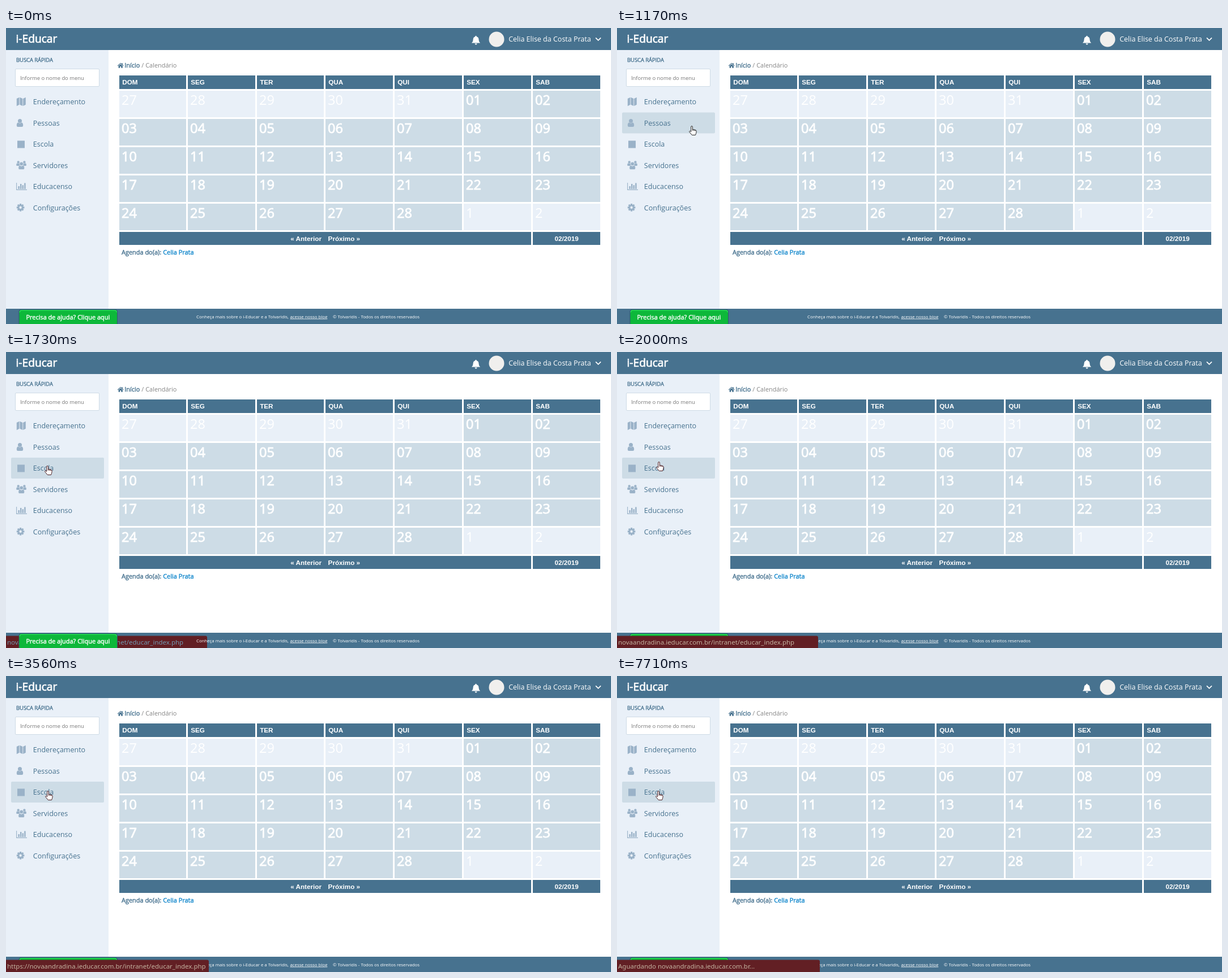
Animation of 1068x524 px, one loop 8 s. Source, as an HTML page:

```html
<!DOCTYPE html>
<html lang="pt-BR">
<head>
<meta charset="utf-8">
<title>Calendário</title>
<style>
html, body { margin: 0; width: 100%; height: 100%; overflow: hidden; background: #fff; }
svg { display: block; width: 1068px; height: 524px; }
text { font-family: "Open Sans", sans-serif; white-space: pre; }
.table { font-family: "Liberation Sans", Arial, sans-serif; font-weight: bold; }
.status { font-family: "Noto Sans", sans-serif; }
</style>
</head>
<body>
<svg id="stage" viewBox="0 0 1068 524"></svg>
<script>
const BLUE = '#47728f', PALE = '#e9f0f8', CELL = '#cddce6', ICON = '#9ab2c8';
const stage = document.getElementById('stage');

const rect = (x, y, w, h, fill, extra = '') =>
  `<rect x="${x}" y="${y}" width="${w}" height="${h}" fill="${fill}" ${extra}/>`;
const text = (x, y, size, fill, str, extra = '') =>
  `<text x="${x}" y="${y}" font-size="${size}" fill="${fill}" ${extra}>${str}</text>`;
// Emboldened regular weight: a thin outline in the text colour
const bold = (x, y, size, fill, str) =>
  text(x, y, size, fill, str, `stroke="${fill}" stroke-width="${(size * .038).toFixed(2)}"`);
const path = (d, fill, extra = '') => `<path d="${d}" fill="${fill}" ${extra}/>`;
const line = (d, color, width) =>
  path(d, 'none', `stroke="${color}" stroke-width="${width}"`);
const person = (x, y, k) =>
  `<g transform="translate(${x} ${y}) scale(${k})"><circle cx="5.5" cy="3.5" r="3.5"/>` +
  '<path d="M2.2 6.2Q5.5 9 8.8 6.2 11.2 7 11.2 11.5 11.2 14 9 14H2Q-.2 14-.2 11.5-.2 7 2.2 6.2z"/></g>';

function header() {
  return rect(0, 0, 1068, 39, BLUE) +
    bold(17.5, 26, 19.2, '#fff', 'i-Educar') +
    path('M829.5 13.8q1.2 0 1.2 1.4 3.8 1 3.8 5.4 0 4 2.6 6H822q2.6-2 2.6-6 0-4.4 3.7-5.4 0-1.4 1.2-1.4zM827.6 27.4h4q-.2 2.2-2 2.2t-2-2.2z', '#fff') +
    '<circle cx="866" cy="20" r="13.5" fill="#f0efed"/>' +
    text(887.2, 24, 12.5, '#fff', 'Celia Elise da Costa Prata') +
    line('M1041 17.3l4.5 4.5 4.5-4.5', '#fff', 1.7);
}

function sidebar() {
  const items = ['Endereçamento', 'Pessoas', 'Escola', 'Servidores', 'Educacenso', 'Configurações'];
  const teeth = [0, 45, 90, 135].map(a =>
    rect(24, 311, 3.2, 13.6, ICON, `transform="rotate(${a} 25.6 317.8)"`)).join('');
  return rect(0, 39, 181, 458, PALE) +
    rect(9, 149.5, 164, 37, CELL, 'rx="2" id="hover"') +
    bold(18, 60, 9.4, BLUE, 'BUSCA RÁPIDA') +
    rect(16.5, 72.5, 148, 31, '#fff', 'rx="1.5" stroke="#cedbe6"') +
    text(25, 91.5, 9.4, '#777', 'Informe o nome do menu') +
    items.map((s, i) => text(47.8, 135 + 37.5 * i, 12.5, BLUE, s)).join('') +
    path('M18.8 125l4.6-2.3v13l-4.6 2.5zM24.3 122.7l5 2.4v13l-5-2.4zM30.2 125.1l4.6-2.4v13l-4.6 2.4z', ICON) +
    `<g fill="${ICON}">${person(19, 161, 1)}` +
    `${person(18.3, 235.3, .62)}${person(29, 235.3, .62)}</g>` +
    rect(20, 199.5, 13, 13, ICON) +
    `<g fill="${ICON}" stroke="${PALE}" stroke-width=".7" id="front">${person(22, 237.2, .95)}</g>` +
    line('M18.6 274v12.4H37', ICON, 1.1) +
    [[21.5, 5], [25, 9], [28.6, 6.8], [32.2, 10.5]].map(([x, h]) =>
      rect(x, 285 - h, 2.4, h, ICON)).join('') +
    teeth + `<circle cx="25.6" cy="317.8" r="3.7" fill="none" stroke="${ICON}" stroke-width="3"/>` +
    `<circle cx="25.6" cy="317.8" r="2.2" fill="${PALE}"/>`;
}

function calendar() {
  const left = [200, 321, 443, 564, 686, 808, 930, 1052];
  const names = ['DOM', 'SEG', 'TER', 'QUA', 'QUI', 'SEX', 'SAB'];
  let out = path('M196.8 66.6l5.4-4.9 2.1 1.9v-1.4h1.6v2.9l1.8 1.5-.7.8-4.8-4.3-4.7 4.3zM198.6 67.2l3.6-3.2 3.7 3.2v3.6h-2.7v-2.7h-1.9v2.7h-2.7z', BLUE) +
    bold(209.3, 70, 10.95, BLUE, 'Início') +
    text(239.3, 70, 10.95, '#858585', '/ Calendário');
  names.forEach((name, c) => {
    const x = left[c], w = left[c + 1] - 3 - x;
    out += rect(x, 84, w, 24, BLUE) + text(x + 5.2, 100.2, 11.7, '#fff', name, 'class="table"');
    for (let r = 0; r < 5; r++) {
      const day = r * 7 + c - 4, y = 111 + 50 * r, inMonth = day > 0 && day < 29;
      const label = inMonth ? String(day).padStart(2, '0') : day < 1 ? day + 31 : day - 28;
      out += rect(x, y, w, 47, inMonth ? CELL : PALE) +
        (inMonth ? bold : text)(x + 4, y + 25, 23.5, '#fff', label);
    }
  });
  return out + rect(200, 361, 727, 23, BLUE) + rect(930, 361, 119, 23, BLUE) +
    [[502.2, '« Anterior'], [568.6, 'Próximo »'], [968.6, '02/2019']].map(([x, s]) =>
      text(x, 376.5, 11.7, '#fff', s, 'class="table"')).join('') +
    bold(204, 400.5, 10.95, BLUE, 'Agenda do(a):') +
    bold(277.2, 400.5, 10.95, '#1488cc', 'Celia Prata');
}

function footer() {
  return '<g id="footer">' +
    text(336, 513.7, 7.8, '#fff', 'Conheça mais sobre o i-Educar e a Tolvaridis,') +
    text(501.5, 513.7, 7.8, '#fff', 'acesse nosso blog', 'text-decoration="underline"') +
    text(577, 513.7, 7.8, '#fff', '© Tolvaridis - Todos os direitos reservados') +
    path('M22.5 524V502.5q0-4.5 4.5-4.5H192.500q4.500 0 4.500 4.500V524z', '#2f5a70') +
    path('M23.5 524V503q0-4 4-4H192q4 0 4 4V524z', '#0db83a') +
    line('M24.2 503.500q0-3.700 3.700-3.700H191.600q3.700 0 3.700 3.700', '#2be25a', 1.3) +
    bold(35.5, 516, 10.95, '#fff', 'Precisa de ajuda? Clique aqui') + '</g>';
}

stage.innerHTML = rect(0, 0, 1068, 524, '#fff') + sidebar() + header() + calendar() +
  rect(0, 497, 1068, 27, BLUE) + footer() +
  '<g id="status"><path id="bar" fill="#621f24"/>' +
  text(2, 517.6, 11.47, '#c3b29f', '', 'class="status" id="message"') + '</g>' +
  '<path id="cursor" fill="#fff" stroke-linejoin="round"/>';

const [hover, foot, status, bar, message, cursor] =
  ['hover', 'footer', 'status', 'bar', 'message', 'cursor'].map(id => document.getElementById(id));

const HAND = 'M3.700 10V1.900a1.300 1.300 0 0 1 2.600 0V6.400l4.700 1q2.400.5 2.200 2.900l-.6 3-1.100 3.200H5.300L1 11.200q-.9-1.600.4-1.900 1-.2 2.300 1.500zM6.300 6.400v2.500M8.700 7v2.200M11 7.500v2';
const ARROW = 'M.5.5V13.300l3-2.600 2 4.600 2.300-1-2-4.500H9.500z';
const HOST = 'novaandradina.ieducar.com.br', PAGE = HOST + '/intranet/educar_index.php';

// [start, text] of the status bubble
const messages = [[0, ''], [1730, PAGE], [2240, 'Aguardando soquete disponível...'],
  [2460, 'Resolvendo host...'], [3010, 'https://' + PAGE], [7480, 'Resolvendo host...'],
  [7630, `Aguardando ${HOST}...`]];
// [start, x, y, shape] of the pointer once it rests on the menu
const rests = [[1600, 68, 201, HAND], [1910, 68, 198, HAND], [1990, 69, 194, HAND],
  [2080, 69, 197, HAND], [2160, 69, 201, HAND], [2240, 72, 204, ARROW], [3090, 69, 203, HAND],
  [3410, 72, 204, ARROW], [3560, 69, 203, HAND], [7630, 72, 204, ARROW], [7710, 68, 203, HAND]];
const at = (list, t) => list.filter(k => k[0] <= t).pop();
const mix = (a, b, k) => a + (b - a) * k;

function pointer(t) {
  if (t >= 1600) return at(rests, t).slice(1);
  const i = Math.floor((t - 860) / 61.6);
  const [x, y] = i < 5
    ? [mix(212, 127, i / 5), mix(166, 173, i / 5)]
    : [mix(127, 68, (i - 5) / 7), mix(173, 201, (i - 5) / 7)];
  return [Math.round(x), Math.round(y), x < 169 ? HAND : ARROW];
}

function draw() {
  const t = performance.now() % 8000, shown = t >= 860;
  cursor.style.display = shown ? '' : 'none';
  hover.style.display = 'none';
  if (shown) {
    const [x, y, shape] = pointer(t);
    cursor.setAttribute('d', shape);
    cursor.setAttribute('transform', `translate(${x} ${y})`);
    cursor.setAttribute('stroke', t < 1730 ? '#222' : '#4a1c20');
    if (x < 169) {
      hover.style.display = '';
      hover.setAttribute('y', t < 1600 && y < 187 ? 149.5 : 187);
    }
  }
  const fading = t < 1910, edge = t < 3010 ? 355 : 358;
  status.style.display = t < 1730 ? 'none' : '';
  stage.insertBefore(status, fading ? foot : cursor);
  bar.setAttribute('d', `M0 524V502.500H${edge - 3}q3 0 3 3V524z`);
  message.setAttribute('fill', fading ? '#7398b0' : '#c3b29f');
  message.textContent = at(messages, t)[1];
  requestAnimationFrame(draw);
}
draw();
</script>
</body>
</html>
```
